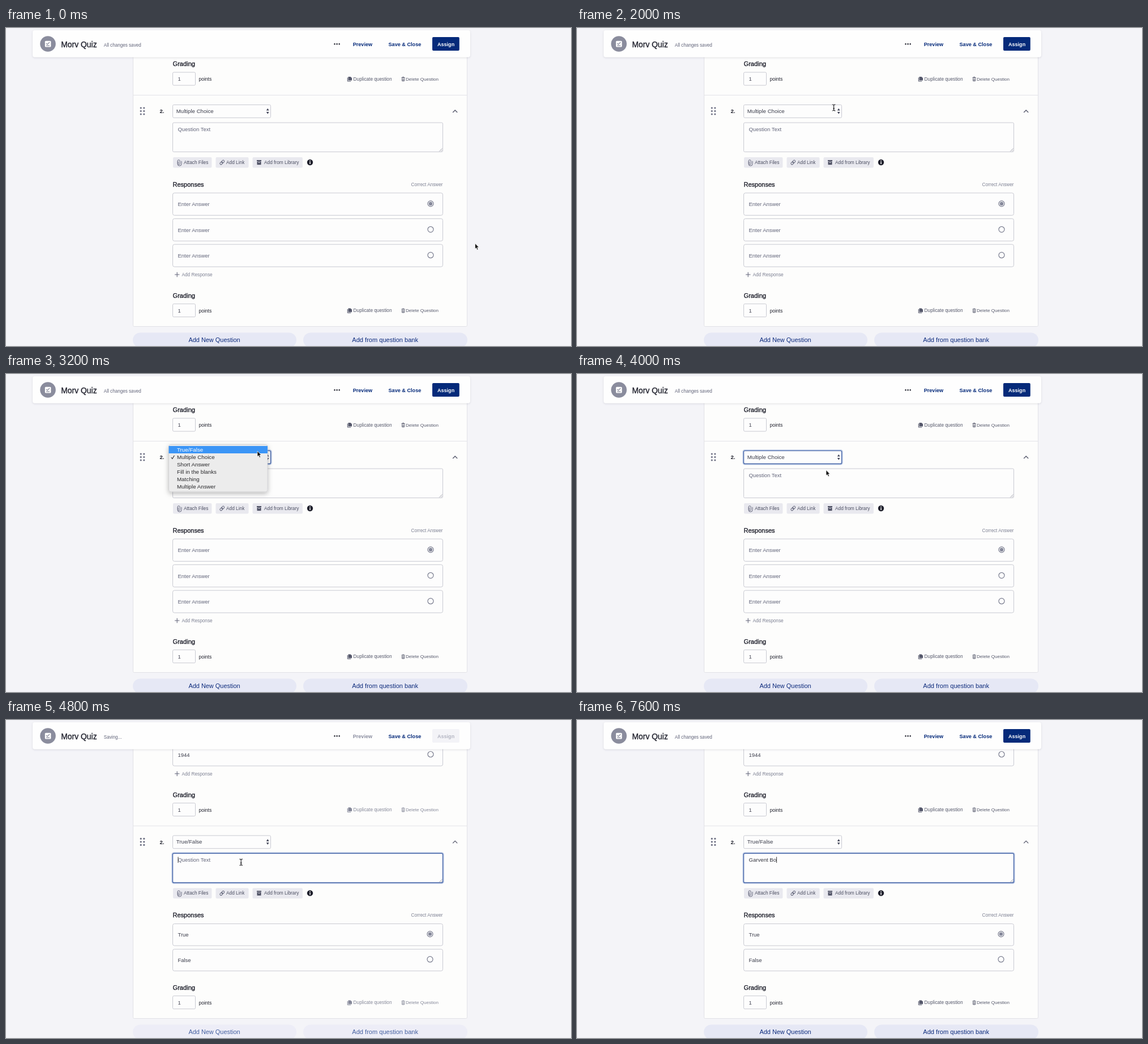
These frames come from a looping animation (998 px wide and 561 px high, 8 s). An HTML page:

```html
<!DOCTYPE html>
<html lang="en">
<head>
<meta charset="utf-8">
<title>Quiz editor</title>
<style>
  html, body { margin: 0; width: 100%; height: 100%; overflow: hidden; background: #f4f4f8; }
  svg { display: block; width: 998px; height: 561px; font-family: "Liberation Sans", Arial, sans-serif; white-space: pre; }
</style>
</head>
<body>
<svg id="stage" viewBox="0 0 998 561"></svg>
<script>
const LOOP = 8000, STEP = 200;
const MENU_OPEN = 2600, MENU_CLOSE = 3800, TYPE_CHANGE = 4200;
const TEXT_FOCUS = 4600, SAVE_START = 4400, SAVE_END = 5400, TYPING = 7200;
const SHIFT = 68.4, BLOCK = 408.6;
const INK = '#1f202c', GREY = '#62657a', MUTED = '#7d8093', NAVY = '#052a7a', LINE = '#c9cad2';
const ANSWER = 'Garvent Bo';
const MENU = ['True/False', 'Multiple Choice', 'Short Answer', 'Fill in the blanks', 'Matching', 'Multiple Answer'];

// y is the middle of the capital letters
const text = (x, y, s, size, fill = INK, extra = '') =>
  `<text x="${x}" y="${y + size * .36}" font-size="${size}" fill="${fill}" ${extra}>${s}</text>`;
const bold = (x, y, s, size, fill) => text(x, y, s, size, fill, 'font-weight="700"');
const medium = (x, y, s, size) => text(x, y, s, size, INK, `stroke="${INK}" stroke-width=".35"`);
const rect = (x, y, w, h, fill, r = 0, extra = '') =>
  `<rect x="${x}" y="${y}" width="${w}" height="${h}" rx="${r}" fill="${fill}" ${extra}/>`;
const box = (x, y, w, h, r = 2) => rect(x, y, w, h, '#fdfdfd', r, `stroke="${LINE}"`);
const circle = (x, y, r, fill, extra = '') => `<circle cx="${x}" cy="${y}" r="${r}" fill="${fill}" ${extra}/>`;
const line = (d, color, w = 1) => `<path d="${d}" fill="none" stroke="${color}" stroke-width="${w}"/>`;
const shape = (d, fill) => `<path d="${d}" fill="${fill}"/>`;
const move = (x, y, body) => `<g transform="translate(${x} ${y})">${body}</g>`;

const focusRing = (x, y, w, h) =>
  rect(x - 1, y - 1, w + 2, h + 2, 'none', 3, 'stroke="#b9c8e4" stroke-width="2.4"') +
  rect(x, y, w, h, 'none', 2, 'stroke="#3c5da3" stroke-width="1.2"');

const radio = (x, y, on) =>
  circle(x, y, 5, '#fdfdfd', 'stroke="#777a8d" stroke-width="1.2"') + (on ? circle(x, y, 3.2, '#85889a') : '');

const row = (y, h, label, color, on, rx = 750, ry = y + h / 2 - .8) =>
  box(294.5, y, 477, h, 3) + text(303.5, y + h / 2, label, 9.45, color) + radio(rx, ry, on);

const addResponse = () =>
  line('M298 435h8.4M302.2 430.8v8.4', GREY, 1.1) + text(310.5, 435, 'Add Response', 8.25, MUTED);

const grading = saving => {
  const color = saving ? '#858899' : '#55586b';
  return medium(294.5, 471.8, 'Grading', 11.1) +
    box(294.5, 486.7, 40, 23) + text(303.5, 498.4, '1', 9.4, '#3c3e4c') + text(340.5, 498.8, 'points', 8.5) +
    shape('M604.5 494.5h4l2.5 2.3v4.4h-6.5z', color) + line('M603.3 496v6.6h6', color, 1) +
    text(613.6, 498.3, 'Duplicate question', 8.25, color) +
    line('M698.5 496h6.2M700.3 495.2h2.6M699.6 497v5h4v-5M701.6 497.5v4', color, 1) +
    text(706, 498.3, 'Delete Question', 8.1, color);
};

const pill = (x, w, tx, label) => rect(x, 228, w, 18.4, '#e9e9ef', 2) + text(tx, 237, label, 8.3, '#4a4d60');

function attachments() {
  return pill(295, 68.4, 314, 'Attach Files') + pill(370.5, 58, 389, 'Add Link') + pill(435.5, 88.4, 456, 'Add from Library') +
    line('M304.2 235.5v4a1.4 1.4 0 0 0 3 0v-4.6a2 2 0 0 0-4.2-.2v5a3.4 3.4 0 0 0 7 0v-5', GREY, 1) +
    `<g transform="rotate(-45 381.7 237)">${rect(377, 235.2, 5.4, 3.8, 'none', 1.9, `stroke="${GREY}"`)}${rect(381, 235.2, 5.4, 3.8, 'none', 1.9, `stroke="${GREY}"`)}</g>` +
    rect(443, 233, 8, 2, '#4a4d60') + rect(443.5, 235.6, 7, 5.6, '#4a4d60') + rect(445.5, 237, 3, 1, '#e9e9ef') +
    circle(537, 237, 5.2, INK) + rect(536.3, 236.2, 1.5, 3.8, '#fff') + circle(537, 234.4, .9, '#fff');
}

function questionTop(t, typed) {
  const trueFalse = t >= TYPE_CHANGE;
  let out = line('M224 118.5H815', '#e3e3e8');
  for (const x of [238.2, 243.8]) for (const y of [141, 146.5, 152]) out += circle(x, y, 1.6, '#6d7083');
  out += bold(271.5, 147, '2.', 9.6, INK) + box(294.5, 135.5, 173, 22.8) +
    text(300.8, 146.6, MENU[trueFalse ? 0 : 1], 9.65, '#3c3e4c') +
    shape('M459.8 145.5l2.4-3.8 2.4 3.8zM459.8 147.9l2.4 3.8 2.4-3.8z', '#44475a') +
    line('M789.2 149l4-4 4 4', '#55586b', 1.3) +
    box(294.5, 167, 477, 51.5) + line('M765.5 217.5l5-5M768.5 217.5l2-2', '#8b8d98', .8);
  if (t >= MENU_OPEN && t < TEXT_FOCUS) out += focusRing(294.5, 135.5, 173, 22.8);
  if (t >= TEXT_FOCUS) out += focusRing(294.5, 167, 477, 51.5);
  out += typed ? text(303.5, 178.3, typed, 9.6, '#33353f') : text(303.5, 178.3, 'Question Text', 9.45, GREY);
  return out + attachments() + medium(294.5, 276, 'Responses', 11) +
    text(771.5, 275.6, 'Correct Answer', 8.2, MUTED, 'text-anchor="end"');
}

function header(saving) {
  const off = '#8b8ea0';
  return rect(47, 4, 773, 47.5, '#fefefe', 4, 'filter="url(#shadow)"') +
    circle(74, 28, 13.8, '#8a8c9d') + rect(68.8, 22.8, 10.6, 10.6, '#fff', 1.5) +
    line('M71 27l2 2 4-4M71 31.2h6', '#8a8c9d', 1.2) +
    medium(97.3, 28.6, 'Morv Quiz', 13.9) +
    text(172.8, 29.8, saving ? 'Saving...' : 'All changes saved', 8.15, GREY) +
    [580.5, 584.6, 588.7].map(x => circle(x, 28.2, 1.2, INK)).join('') +
    bold(612.7, 28.6, 'Preview', 9.1, saving ? off : NAVY) + bold(675.5, 28.6, 'Save &amp; Close', 9.15, NAVY) +
    rect(753, 16, 47.8, 24, saving ? '#f3f3f7' : NAVY, 2) + bold(762, 28.4, 'Assign', 9.05, saving ? '#b3b5c2' : '#fff');
}

function footer(saving) {
  const fill = saving ? '#ededf7' : '#e6e8f5', ink = saving ? '#4560a0' : '#0d2b7c';
  return rect(224, 537.5, 289, 26, fill, 13) + rect(525, 537.5, 290, 26, fill, 13) +
    text(368, 550.4, 'Add New Question', 10.95, ink, 'text-anchor="middle"') +
    text(669.7, 550.4, 'Add from question bank', 11.05, ink, 'text-anchor="middle"');
}

function menu(active) {
  return rect(287.5, 124.5, 174.5, 83.3, '#ececec', 3.5, 'stroke="#c4c4c8" stroke-width=".6" filter="url(#menuShadow)"') +
    rect(287.5, 127 + active * 12.9, 174.5, 13, '#3b95f6') +
    MENU.map((item, i) => text(302, 133.5 + i * 12.9, item, 9.75, i === active ? '#fff' : '#2b2b2e')).join('') +
    line('M291.8 147l2 2.6 3.6-5.8', active === 1 ? '#fff' : '#2b2b2e', 1.1);
}

const PATH = [[0, 828.5, 380], [400, 828.5, 380], [2000, 453.6, 140.5], [2600, 446, 141], [3200, 444, 136],
  [3600, 443, 136], [4000, 440, 169.5], [4600, 415.2, 250.8], [SAVE_END, 415.2, 250.8]];

function pointer(t) {
  const next = PATH.findIndex(p => p[0] > t);
  if (next < 0) return '';
  const [t0, x0, y0] = PATH[next - 1], [t1, x1, y1] = PATH[next];
  const u = (t - t0) / (t1 - t0), k = u * u * (3 - 2 * u);
  const beam = t >= 800 && t <= 2200 || t >= 4400;
  return move(x0 + (x1 - x0) * k, y0 + (y1 - y0) * k, beam
    ? line('M-2.8-5.5Q0-5.5 0-4Q0-5.5 2.8-5.5M0-4.5V4.5M-2.8 5.5Q0 5.5 0 4Q0 5.5 2.8 5.5M-1.5 1.5h3', '#17171b', 1.1)
    : '<path d="M0 0v9.8l2.2-2 1.6 3.6 1.7-.8-1.6-3.5h3z" fill="#111" stroke="#fff" stroke-width=".7"/>');
}

function caret(t, typed) {
  const on = typed || t >= TEXT_FOCUS && (t - TEXT_FOCUS) % 1060 < 530;
  if (!on) return;
  const label = [...stage.querySelectorAll('text')].find(el => typed && el.textContent === typed);
  const x = 303.6 + (label ? label.getComputedTextLength() : 0);
  stage.insertAdjacentHTML('beforeend', rect(x, 241.5, .9, 10.5, '#222'));
}

const DEFS = `<defs>
  <filter id="shadow" x="-5%" y="-30%" width="110%" height="170%"><feDropShadow dx="0" dy="1" stdDeviation="1.5" flood-color="#555870" flood-opacity=".2"/></filter>
  <filter id="menuShadow" x="-20%" y="-20%" width="140%" height="150%"><feDropShadow dx="0" dy="3" stdDeviation="4" flood-opacity=".28"/></filter>
</defs>`;

function render(t) {
  const trueFalse = t >= TYPE_CHANGE, shift = trueFalse ? SHIFT : 0;
  const saving = t >= SAVE_START && t < SAVE_END;
  const typed = t < TYPING ? '' : ANSWER.slice(0, 1 + Math.round((t - TYPING) / 400 * 9));
  const responses = trueFalse
    ? row(359.5, 38.6, 'True', '#3c3e4c', true, 749, 377.6) + row(404.3, 38.4, 'False', '#3c3e4c', false, 749, 422.2)
    : [291, 336.4, 381.8].map((y, i) => row(y, 39.4, 'Enter Answer', GREY, i === 0)).join('') + addResponse();
  stage.innerHTML = DEFS + rect(0, 0, 998, 561, '#f4f4f8') +
    rect(224.5, 40, 590, 486.5, '#fdfdfc', 2, 'stroke="#e2e2e7"') +
    move(0, shift - BLOCK, (trueFalse ? row(381.8, 39.4, '1944', '#3c3e4c', false) + addResponse() : '') + grading(saving)) +
    move(0, shift, questionTop(t, typed)) + responses + grading(saving) + footer(saving) + header(saving) +
    (t >= MENU_OPEN && t < MENU_CLOSE ? menu(t < 3000 ? 1 : 0) : '') + pointer(t);
  caret(t, typed);
}

const stage = document.getElementById('stage');
let shown = -1;
function tick() {
  const t = Math.floor(performance.now() % LOOP / STEP) * STEP;
  if (t !== shown) render(shown = t);
  requestAnimationFrame(tick);
}
tick();
</script>
</body>
</html>
```
